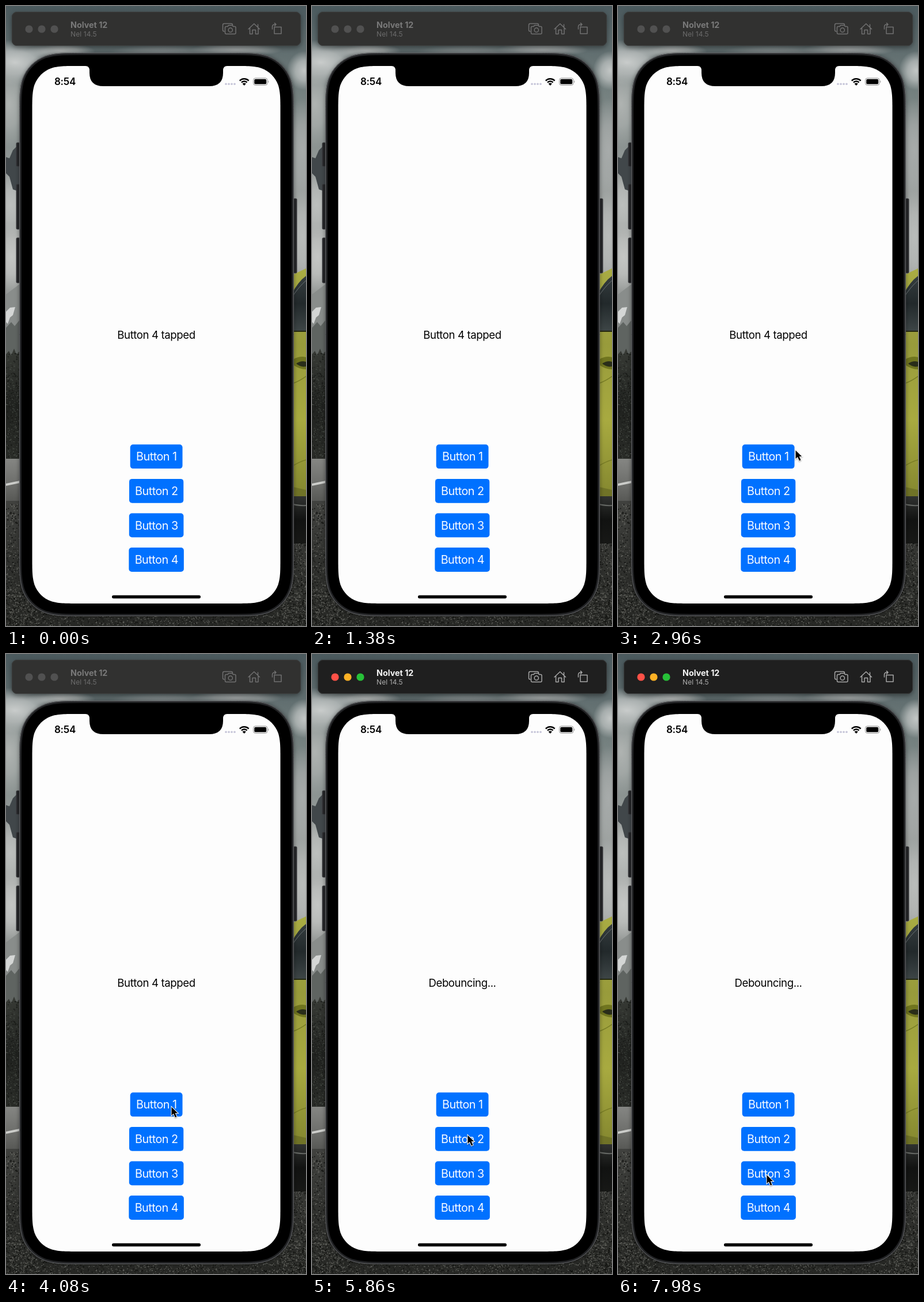
An HTML page with a canvas for the animation above (8 s loop, 521x1075 px).

```html
<!DOCTYPE html>
<html lang="en">
<head>
<meta charset="utf-8">
<style>
html, body { margin: 0; width: 100%; height: 100%; overflow: hidden; background: #000; }
canvas { display: block; width: 521px; height: 1075px; }
</style>
</head>
<body>
<canvas id="stage" width="521" height="1075"></canvas>
<script>
const W = 521, H = 1075, LOOP = 8000;
const ACTIVATE = 4500;
const FONT = 'Inter, "Open Sans", sans-serif';
const stage = document.getElementById('stage').getContext('2d');
const backdrop = document.createElement('canvas');
backdrop.width = W;
backdrop.height = H;
let c = backdrop.getContext('2d');

// Cursor tip: time, x, y
const cursorPath = [
  [2500, 521, 742], [2900, 308, 770], [3100, 308, 770], [3600, 287, 785],
  [5100, 287, 785], [5650, 270, 834], [6800, 270, 834], [7400, 258, 903], [8000, 258, 903]
];

let seed = 17;
function random() {
  seed = (seed * 16807) % 2147483647;
  return seed / 2147483647;
}

function paint(fill, stroke, line) {
  if (fill) { c.fillStyle = fill; c.fill(); }
  if (stroke) { c.strokeStyle = stroke; c.lineWidth = line; c.stroke(); }
}

function box(x, y, w, h, r, fill, stroke, line = 1) {
  c.beginPath();
  c.roundRect(x, y, w, h, r);
  paint(fill, stroke, line);
}

// Rounded box whose corners ease into the straight sides
function smoothBox(x, y, w, h, r, fill, stroke, line = 1) {
  c.beginPath();
  [[x, y, 1, 0], [x + w, y, 0, 1], [x + w, y + h, -1, 0], [x, y + h, 0, -1]].forEach(([cx, cy, ux, uy], i) => {
    const at = (a, b) => [cx + r * (a * ux - b * uy), cy + r * (a * uy + b * ux)];
    const first = at(0, 1.528);
    if (i) c.lineTo(...first); else c.moveTo(...first);
    c.bezierCurveTo(...at(0, 1.088), ...at(0, .868), ...at(.075, .631));
    c.bezierCurveTo(...at(.169, .372), ...at(.372, .169), ...at(.631, .075));
    c.bezierCurveTo(...at(.868, 0), ...at(1.088, 0), ...at(1.528, 0));
  });
  c.closePath();
  paint(fill, stroke, line);
}

function disc(x, y, r, fill) {
  c.beginPath();
  c.arc(x, y, r, 0, Math.PI * 2);
  paint(fill);
}

function shape(d, fill, stroke, line = 1.5) {
  const p = new Path2D(d);
  if (fill) { c.fillStyle = fill; c.fill(p); }
  if (stroke) { c.strokeStyle = stroke; c.lineWidth = line; c.stroke(p); }
}

function text(s, x, y, size, weight, fill, align = 'left', spacing = 0) {
  c.font = `${weight} ${size}px ${FONT}`;
  c.letterSpacing = spacing + 'px';
  c.textAlign = align;
  c.fillStyle = fill;
  c.fillText(s, x, y);
}

function gradient(y0, y1, ...colors) {
  const g = c.createLinearGradient(0, y0, 0, y1);
  colors.forEach((color, i) => g.addColorStop(i / (colors.length - 1), color));
  return g;
}

function cloud(x, y, rx, ry, color) {
  c.save();
  c.translate(x, y);
  c.scale(rx, ry);
  const g = c.createRadialGradient(0, 0, 0, 0, 0, 1);
  g.addColorStop(0, color);
  g.addColorStop(.5, color + 'b0');
  g.addColorStop(1, color + '00');
  c.fillStyle = g;
  c.fillRect(-1, -1, 2, 2);
  c.restore();
}

function speckle(count, x, y, w, h, colors) {
  for (let i = 0; i < count; i++) {
    c.fillStyle = colors[Math.floor(random() * colors.length)];
    c.fillRect(x + random() * w, y + random() * h, 1 + random() * 1.5, 1 + random());
  }
}

function drawScenery() {
  c.fillStyle = gradient(0, 600, '#4b5a5e', '#74807f', '#999e9c', '#a3a6a4', '#7c817f');
  c.fillRect(0, 0, W, H);
  cloud(15, 98, 75, 40, '#c9cccb');
  cloud(95, 78, 60, 13, '#b3b7b6');
  cloud(270, 80, 90, 13, '#838c8d');
  cloud(400, 76, 80, 12, '#a3a8a8');
  cloud(518, 112, 30, 34, '#c2c6c5');
  cloud(5, 170, 45, 75, '#afb3b1');
  cloud(8, 345, 40, 55, '#bcbfbd');
  cloud(10, 435, 40, 60, '#c4c6c4');
  cloud(515, 250, 35, 90, '#a7abaa');
  cloud(515, 400, 35, 80, '#b9bcba');
  shape('M0 262 L6 264 L12 250 L24 238 V322 L12 318 L6 296 L0 290 Z', '#41474a');
  shape('M0 500 L24 482 V610 H0 Z', '#898d8b');
  shape('M0 530 L7 523 L16 522 L12 536 L7 540 L3 551 L0 548 Z', '#d4d6d5');
  shape('M0 558 L9 548 L15 555 L24 544 V640 H0 Z', '#5f6461');

  shape('M0 604 L5 598 L9 606 L14 594 L18 604 L24 598 V785 H0 Z', gradient(600, 785, '#363934', '#20221f', '#292b27'));
  speckle(350, 0, 600, 24, 183, ['#171916', '#353934', '#444842']);
  c.fillStyle = gradient(785, 862, '#858683', '#70716e', '#555653');
  c.fillRect(0, 785, W, 77);
  shape('M0 828 L24 823 V827 L0 832 Z', '#cccdca');
  c.fillStyle = gradient(850, H, '#424340', '#30312e', '#262724');
  c.fillRect(0, 858, W, H - 858);
  speckle(900, 0, 862, 55, 213, ['#131412', '#3f403c', '#62635e']);
  speckle(2800, 0, 1010, W, 65, ['#11120f', '#3a3b37', '#5d5e59']);
  speckle(800, 475, 930, 46, 145, ['#11120f', '#3a3b37', '#5d5e59']);

  shape('M490 470 Q506 462 521 455 V850 H490 Z', gradient(455, 850, '#a9ac43', '#989b3b', '#a8aa40', '#84872f'));
  shape('M496 500 Q507 478 521 468 V563 H496 Z', gradient(468, 563, '#343c3e', '#22292b', '#3d4546'));
  shape('M496 506 Q508 487 521 476', null, '#697173', 1);
  shape('M496 564 H521', null, '#24280f', 2);
  shape('M500 612 Q511 606 521 609 V630 Q510 630 500 623 Z', '#70751f');
  shape('M504 620 Q513 614 521 617 V625 Q512 627 504 620 Z', '#292d19');
  shape('M497 655 Q512 649 521 642 M497 798 Q510 790 521 787', null, '#787c25', 1.5);
  shape('M490 832 L521 839 V854 H490 Z', '#707327');
  shape('M490 850 H521 V932 H490 Z', gradient(850, 932, '#303230', '#111211', '#171816'));
  shape('M490 862 Q508 867 521 866', null, '#646763', 2);
}

function drawPhone() {
  for (const [x, y, h] of [[18, 237, 41], [18, 309, 78], [18, 402, 78], [499, 334, 129]]) {
    box(x, y, 6, h, 1.5, '#252628', '#3c3d40');
  }
  c.save();
  c.shadowColor = 'rgba(0,0,0,.4)';
  c.shadowBlur = 7;
  smoothBox(23, 81, 477, 977, 72, '#2c2d2f');
  c.restore();
  smoothBox(23.5, 81.5, 476, 976, 71.5, null, '#606164');
  smoothBox(26, 84, 471, 971, 69, '#000', '#202123', 2);
  smoothBox(45.5, 104, 431, 932, 52, '#fdfdfd');
  shape('M138 103 V104 Q145 104 145 112 V116 Q145 139 169 139 H353 Q377 139 377 116 V112 Q377 104 384 104 V103 Z', '#000');

  text('8:54', 102.5, 137, 17, 600, '#000', 'center', -0.2);
  for (let i = 0; i < 4; i++) disc(382 + i * 5, 135.3, 1.8, '#c5c4d8');
  c.strokeStyle = '#000';
  c.lineWidth = 2.5;
  for (const r of [6.5, 10.8]) {
    c.beginPath();
    c.arc(413.7, 137, r, -Math.PI * .76, -Math.PI * .24);
    c.stroke();
  }
  shape('M413.7 138 L410.6 134.8 Q413.7 132.2 416.8 134.8 Z', '#000');
  box(429.5, 125, 24.5, 12.4, 3.7, null, '#939393');
  box(431.2, 126.8, 21, 8.8, 2.2, '#000');
  shape('M455.3 129 Q457.5 131.2 455.3 133.4 Z', '#939393');

  [90.8, 94.3, 94.6, 95.5].forEach((w, i) => {
    const y = 760.3 + i * 59.6;
    box(261.1 - w / 2, y, w, 41.8, 5, '#0071ff');
    text('Button ' + (i + 1), 261.3, y + 28, 19.8, 400, '#f8fbff', 'center', -0.5);
  });
  box(184, 1021.8, 154, 5.4, 2.7, '#000');
}

function drawToolbar(active) {
  c.save();
  c.shadowColor = 'rgba(0,0,0,.45)';
  c.shadowBlur = 10;
  c.shadowOffsetY = 3;
  box(10, 10, 502, 59, 9, active ? '#1f1f1f' : '#313130');
  c.restore();
  box(10.5, 10.5, 501, 58, 8.5, null, active ? '#353636' : '#3b3b3a');
  ['#ff5147', '#fdb125', '#27c138'].forEach((color, i) =>
    disc(40 + i * 22, 40, 6.6, active ? color : '#515151'));
  text('Nolvet 12', 112, 37.5, 14.3, 700, active ? '#f5f5f5' : '#797979');
  text('Nel 14.5', 112, 53, 12, 400, active ? '#adadad' : '#6c6c6c', 'left', 0.1);

  const ink = active ? '#a7a7a7' : '#707070';
  c.lineJoin = c.lineCap = 'round';
  shape('M379 44 Q376.5 44 376.5 41.5 V33 Q376.5 30.5 379 30.5 H391 Q393.5 30.5 393.5 33', null, ink);
  shape('M382.5 35.5 H385 L386.5 33.5 H393 L394.5 35.5 H397 Q399 35.5 399 37.5 V46.5 Q399 48.5 397 48.5 H382.5 Q380.5 48.5 380.5 46.5 V37.5 Q380.5 35.5 382.5 35.5 Z', null, ink);
  c.beginPath();
  c.arc(389.8, 41.7, 3.6, 0, Math.PI * 2);
  c.stroke();
  shape('M421 40 L430.8 30.8 L440.5 40 M423.5 38 V48.5 H428 V41.5 H433.5 V48.5 H438 V38 M437.5 36.5 V32', null, ink);
  shape('M466 36.5 H478 V48 H466 Z M462.5 40 V36 Q462.5 32 467 32 H469 M466.5 29.5 L469 32 L466.5 34.5', null, ink);
}

function drawCursor(t) {
  const next = cursorPath.findIndex(p => p[0] > t);
  if (next < 1) return;
  const [t0, x0, y0] = cursorPath[next - 1];
  const [t1, x1, y1] = cursorPath[next];
  const u = (t - t0) / (t1 - t0), k = u * u * (3 - 2 * u);
  c.save();
  c.translate(x0 + (x1 - x0) * k, y0 + (y1 - y0) * k);
  c.shadowColor = 'rgba(0,0,0,.35)';
  c.shadowBlur = 2;
  c.shadowOffsetY = 1;
  c.lineJoin = 'miter';
  const arrow = 'M.5 .5 V15 L3.9 12 L6.9 18.5 L9.5 17.3 L6.7 11 H11.2 Z';
  shape(arrow, null, '#fff', 2);
  c.shadowColor = 'transparent';
  shape(arrow, '#000');
  c.restore();
}

drawScenery();
drawPhone();
c = stage;

const start = performance.now();
function render() {
  const t = (performance.now() - start) % LOOP;
  const active = t >= ACTIVATE;
  c.drawImage(backdrop, 0, 0);
  drawToolbar(active);
  text(active ? 'Debouncing...' : 'Button 4 tapped', 261, 577, 18.6, 400, '#000', 'center', -0.4);
  drawCursor(t);
  requestAnimationFrame(render);
}
render();
</script>
</body>
</html>
```
